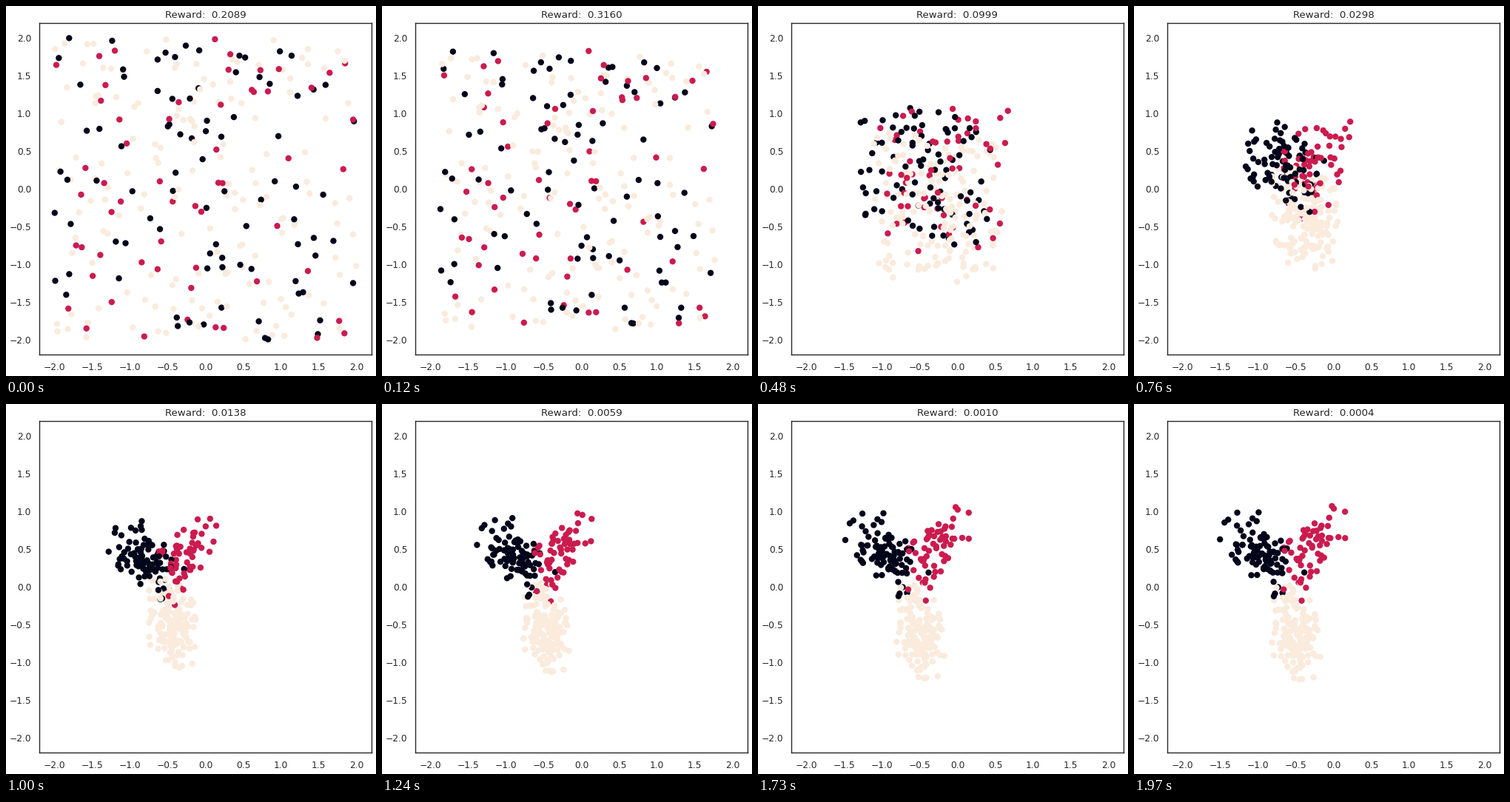
These frames come from a looping animation (500x500 px, 2 s). A matplotlib script:

```python
import numpy as np
import matplotlib.pyplot as plt
from matplotlib.animation import FuncAnimation

LOOP_MS, TICK_MS, STEPS = 2000, 10, 66
TICKS = LOOP_MS // TICK_MS
SIZE, DPI = 500, 80
INK = "#262626"
HUB = np.array([-0.62, 0.0])      # where the three lobes meet
CENTRE = np.array([-0.2, 0.0])    # where the crowd gathers on the way

plt.rcParams.update({
    "font.family": "DejaVu Sans",
    "text.color": INK,
    "axes.edgecolor": INK,
    "axes.linewidth": 1.25,
    "axes.titlesize": 12,
    "xtick.labelsize": 11,
    "ytick.labelsize": 11,
    "xtick.labelcolor": INK,
    "ytick.labelcolor": INK,
    "xtick.major.size": 6,
    "ytick.major.size": 6,
    "xtick.bottom": False,
    "ytick.left": False,
})

GROUPS = [
    dict(color="#03051A", count=88, angle=128, reach=0.58, length=0.29),
    dict(color="#CB1B4F", count=58, angle=58, reach=0.64, length=0.33),
    dict(color="#FAEBDD", count=154, angle=-81, reach=0.62, length=0.30),
]
WIDTH = 0.15

rng = np.random.default_rng(5)


def lobe(start, angle, reach, length):
    """Rest places that partly keep the order of the starting places."""
    a = np.radians(angle)
    axes = np.array([[np.cos(a), np.sin(a)], [-np.sin(a), np.cos(a)]])
    noise = rng.normal(size=start.shape)
    z = np.clip(0.5 * start @ axes.T / 1.155 + 0.87 * noise, -2.1, 2.1)
    return HUB + (np.array([reach, 0]) + z * [length, WIDTH]) @ axes


def build(color, count, **shape):
    start = rng.uniform(-2, 2, (count, 2))
    return start, lobe(start, **shape), np.full(count, color)


start, rest, color = (np.concatenate(part) for part in
                      zip(*(build(**g) for g in GROUPS)))
order = rng.permutation(len(start))
start, rest, color = start[order], rest[order], color[order]

KEYS = [0, 8, 16, 25, 33, 49, 65]
REWARDS = [0.2089, 0.4780, 0.0999, 0.0298, 0.0138, 0.0025, 0.0004]


def reward(k):
    return np.exp(np.interp(k, KEYS, np.log(REWARDS)))


def positions(k):
    pull = np.exp(-(k / 16.5) ** 1.6)
    gather = 0.5 * np.exp(-(k / 32) ** 2)
    goal = rest + (CENTRE - rest) * gather
    return goal + (start - goal) * pull


fig = plt.figure(figsize=(SIZE / DPI, SIZE / DPI), dpi=DPI, facecolor="white")
ax = fig.add_axes([45 / SIZE, 28.65 / SIZE, 449 / SIZE, 448.7 / SIZE])
ax.set(xlim=(-2.2, 2.2), ylim=(-2.2, 2.2))
marks = np.arange(-2, 2.1, 0.5)
ax.set_xticks(marks)
ax.set_yticks(marks)
dots = ax.scatter(*start.T, c=color, s=36, linewidths=1.5)
title = ax.set_title("")


def update(tick):
    # Each step is held for about three ticks.
    k = (2 * tick + 1) * STEPS // (2 * TICKS)
    dots.set_offsets(positions(k))
    title.set_text(f"Reward:  {reward(k):.4f}")
    return dots, title


anim = FuncAnimation(fig, update, frames=TICKS, interval=TICK_MS,
                     repeat=True, repeat_delay=0, blit=False)
plt.show()
```
